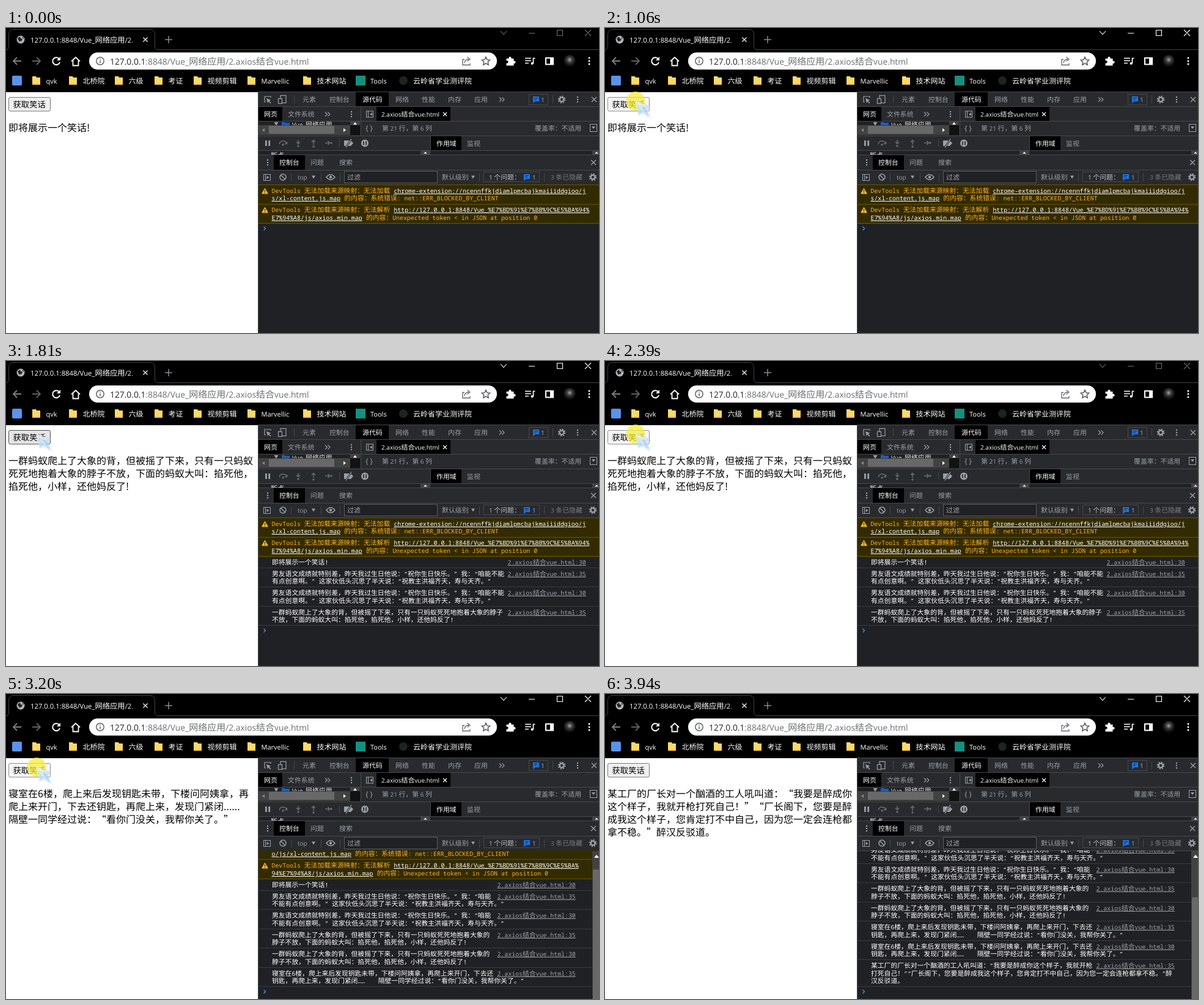
Animation of 970 by 499 pixels, one loop 4.35 s. Source, as an HTML page:

```html
<!DOCTYPE html>
<html lang="zh-CN">
<head>
<meta charset="utf-8">
<title>axios + vue</title>
<style>
html, body { margin: 0; width: 100%; height: 100%; overflow: hidden; background: #000; }
svg { display: block; text-spacing-trim: space-all; }
text { white-space: pre; text-rendering: geometricPrecision; font-family: "Noto Sans CJK SC", sans-serif; }
.ui { font-family: "Open Sans", "Noto Sans CJK SC", sans-serif; }
.mono { font-family: "Noto Sans Mono", monospace; }
.strong, #rows { font-weight: 500; }
.u { text-decoration: underline; text-decoration-skip-ink: none; }
</style>
</head>
<body>
<svg id="stage" width="970" height="499" viewBox="0 0 970 499" xmlns="http://www.w3.org/2000/svg"></svg>
<script>
const LOOP = 4350;
const CJK = /[\u3000-\u9fff\uff00-\uffef]+|[^\u3000-\u9fff\uff00-\uffef]+/g;
const isCjk = c => /[\u3000-\u9fff\uff00-\uffef]/.test(c);
const GREY = '#9aa0a6', LIGHT = '#e8eaed', ORANGE = '#ffb02a', BAR = '#292a2d', LINE = '#46484c';

// drawing helpers
const esc = s => s.replace(/&/g, '&amp;').replace(/</g, '&lt;');
const rect = (x, y, w, h, fill, more = '') => `<rect x="${x}" y="${y}" width="${w}" height="${h}" fill="${fill}" ${more}/>`;
const circ = (x, y, r, fill, more = '') => `<circle cx="${x}" cy="${y}" r="${r}" fill="${fill}" ${more}/>`;
const line = (d, color, w = 1, more = '') => `<path d="${d}" fill="none" stroke="${color}" stroke-width="${w}" ${more}/>`;
const shape = (d, fill, more = '') => `<path d="${d}" fill="${fill}" ${more}/>`;
const runs = (s, size, cls) => s.match(CJK).map(p => isCjk(p[0])
  ? `<tspan>${p}</tspan>`
  : `<tspan class="${cls}" font-size="${(size * .9167).toFixed(2)}">${esc(p)}</tspan>`).join('');
const text = (x, y, s, size, fill, cls = 'ui', more = '') =>
  `<text x="${x}" y="${y}" font-size="${size}" fill="${fill}" ${more}>${runs(s, size, cls)}</text>`;
const label = (x, y, s, fill = GREY) => text(x, y, s, 10.9, fill);
const strong = (x, y, s, size, fill = '#fff') => text(x, y, s, size, fill, 'ui', 'class="strong"');
const mono = (x, y, s, fill, more) => text(x, y, s, 10.8, fill, 'mono', more);
const cross = (x, y, r, color, w = 1.4) => line(`M${x - r} ${y - r}l${2 * r} ${2 * r}m0 ${-2 * r}l${-2 * r} ${2 * r}`, color, w);
const dots = (x, y, color, gap = 4, r = 1.2) => [-1, 0, 1].map(i => circ(x, y + i * gap, r, color)).join('');
const gear = (x, y) => circ(x, y, 3.4, 'none', `stroke="${GREY}" stroke-width="2.4"`) +
  circ(x, y, 5.3, 'none', `stroke="${GREY}" stroke-width="2" stroke-dasharray="2.08"`);
const bubble = (x, y) => shape(`M${x - 5} ${y - 5}h10v8h-6l-4 3z`, '#1a73e8') + line(`M${x - 3} ${y - 2.5}h6m-6 2.5h4`, BAR);
const sep = (x, y, h = 13) => line(`M${x} ${y}v${h}`, LINE);
const tri = (x, y, w, h, color) => shape(`M${x - w} ${y - h}h${2 * w}l${-w} ${2 * h}z`, color);
const more = (x, y) => line(`M${x} ${y - 3.5}l3.5 3.5-3.5 3.5m4.500-7l3.500 3.500-3.500 3.500`, GREY, 1.1);

function browser() {
  const folder = x => shape(`M${x} 79h6l1 2h6v12h-13z`, '#fbd968') + shape(`M${x} 91h13v2h-13z`, '#eebd45');
  const marks = [[43, 'qvk'], [103, '北桥院'], [178, '六级'], [243, '考证'], [307, '视频剪辑'], [395, 'Marvellic'], [486, '技术网站']];
  return rect(0, 0, 970, 105, '#000') +
    line('M0 35.5Q4.5 35.5 4.5 30V11Q4.5 2.5 12 2.5H236Q243.5 2.5 243.5 11V30Q243.5 35.5 249 35.5H970', '#404245') +
    circ(24, 19, 6.5, '#b4b7ba') + shape('M19 17l4-3 1 3 3 1-2 4-2-1-1 2zM26 14l3 2-1 2z', '#222') +
    strong(40, 24, '127.0.0.1:8848/Vue_网络应用/2.', 12.3) + rect(202, 8, 18, 24, 'url(#fade)') +
    cross(228, 19, 3.6, '#e8eaed') + line('M260 19h12m-6-6v12', '#888b8e', 1.5) +
    line('M25 54H12m6-6l-6 6 6 6', '#7d8084', 1.8) + line('M43 54h13m-6-6l6 6-6 6', '#5d6064', 1.8) +
    line('M87 50.5A6 6 0 1 0 88 56', '#fff', 2) + shape('M89 47v6h-6z', '#fff') +
    line('M107 54.5l7-6.5 7 6.5M109.5 53v8.5h9V53', '#fff', 1.8) +
    rect(136, 40, 667, 28, '#fff', 'rx="14"') +
    circ(154, 54, 6.2, 'none', 'stroke="#5f6368" stroke-width="1.5"') + line('M154 53v4.5m0-7.5v1.6', '#5f6368', 1.5) +
    `<text x="170" y="59.5" font-size="15"><tspan class="ui" font-size="13.8" fill="#202124">127.0.0.1</tspan><tspan fill="#6a6e73">${runs(':8848/Vue_网络应用/2.axios结合vue.html', 15.05, 'ui')}</tspan></text>` +
    line('M750 51.5h-3v9h12v-3M750 57q1-6 7-6m-2.5-3.5l4.5 3.5-4.5 3.5', '#5f6368', 1.3) +
    line('M785 47.5l2 4.4 4.7.5-3.5 3.2 1 4.7-4.2-2.4-4.2 2.4 1-4.7-3.5-3.2 4.7-.5z', '#4b4f53', 1.4) +
    shape('M818.5 50h4a2.2 2.2 0 1 1 4 0h4v4a2.2 2.2 0 1 1 0 4v3.5h-12v-4a2.2 2.2 0 1 0 0-4z', '#fff') +
    line('M849 49.5h10m-10 4h10m-10 4h6M862.5 58V49.5h3', '#fff', 1.7) + circ(860.7, 58, 2.1, '#fff') +
    rect(883, 49, 12, 10.5, 'none', 'stroke="#fff" stroke-width="2"') + rect(890, 49, 5, 10, '#fff') +
    circ(922, 54, 10, 'url(#photo)') + dots(954, 54, '#fff', 5, 1.5) +
    rect(10, 78, 16, 16, '#5a93ea', 'rx="2"') +
    marks.map(([x, s]) => folder(x) + strong(x + 22.5, 91, s, 12)).join('') +
    rect(572, 78, 16, 16, '#15907f') + strong(596, 91, 'Tools', 12) +
    circ(650, 86, 7, '#1c2422') + strong(666, 91, '云岭省学业测评院', 12);
}

function devtools() {
  const tab = (x, y, w, h) => rect(x, y, w, h, '#000');
  const hr = y => line(`M413 ${y}H970`, LINE);
  const tabs = [[485, '元素'], [529, '控制台'], [637, '网络'], [680, '性能'], [723, '内存'], [766, '应用']];
  return rect(412, 104, 558, 395, '#202124') + rect(413, 105, 557, 152, BAR) + line('M412.5 104V499M412 104.5H970', LINE) +
    // main tabs
    line('M425 121h-2v-9h10v2', GREY, 1.2) + shape('M426 115l7.5 3-3 1 3 3.5-1.2 1-3-3.3-1.3 2.8z', GREY) +
    rect(449, 110.5, 9, 12, 'none', `stroke="${GREY}" stroke-width="1.2"`) + rect(445.5, 115.5, 6, 8, BAR, `stroke="${GREY}" stroke-width="1.2"`) +
    sep(471.5, 110) + tabs.map(([x, s]) => label(x, 121, s)).join('') +
    tab(572, 105, 54, 23) + label(583, 121, '源代码', '#fff') + more(807, 117) +
    rect(855.5, 108.5, 31, 17, 'none', `stroke="${LINE}"`) + bubble(867, 117) + label(875, 121, '1', '#8ab4f8') +
    sep(894.5, 110) + gear(909, 117) + dots(935, 117, GREY) + cross(962, 117, 4, GREY) + hr(128.5) +
    // navigator and editor
    tab(413, 129, 39, 23) + label(422, 145, '网页', '#fff') + label(461, 145, '文件系统') + more(522, 141) + dots(565, 141, GREY) +
    line('M580.5 129v47', LINE) + rect(589.5, 136, 11, 10, 'none', `stroke="${GREY}"`) + line('M592.5 136v10', GREY) + shape('M599 138.5v5l-4-2.5z', GREY) +
    tab(606, 129, 121, 23) + label(614, 145, '2.axios结合vue.html', '#fff') + cross(718, 141, 3, '#fff', 1.2) + hr(152.5) +
    rect(413, 153, 167, 23, '#202124') +
    `<g clip-path="url(#tree)">${tri(442, 157, 3.5, 3, GREY)}${shape('M451 154h5l1 1h7v9h-13z', '#1a5fc0')}${label(468, 162, 'Vue_网络应用', LIGHT)}</g>` +
    rect(563, 153, 16, 6, '#424242') + rect(563, 159, 16, 16, '#121212') + tri(571, 156, 3, -2, '#fff') +
    rect(413, 159, 150, 16, '#424242') + rect(430, 160, 107, 13, '#686868') + shape('M423 164v6l-4-3z', '#8a8a8a') + shape('M552 164v6l4-3z', '#fff') +
    strong(588, 168, '{ }', 13, GREY) + label(615, 168, '第 21 行，第 6 列') + label(865, 168, '覆盖率：不适用') +
    rect(955.5, 157.5, 11, 12, 'none', `stroke="${GREY}"`) + tri(961, 163, 3, 2, GREY) + hr(176.5) +
    // debugger
    rect(424, 184, 2.8, 9, GREY) + rect(429.3, 184, 2.8, 9, GREY) +
    line('M447 190q1-5 6-5t6 4m.5-3v3.5h-4', '#696c70', 1.5) + circ(453, 191, 1.7, '#696c70') +
    line('M478 183v6m-3-2.5l3 3 3-3', '#696c70', 1.5) + circ(478, 193, 1.7, '#696c70') +
    line('M503 191v-7m-3 2.5l3-3 3 3', '#696c70', 1.5) + circ(503, 194, 1.7, '#696c70') +
    line('M522 188h7m-2.5-3l3 3-3 3', '#696c70', 1.5) + circ(532, 188, 1.7, '#696c70') +
    sep(545.5, 182) + shape('M553 184h11l4 4.5-4 4.5h-11z', GREY) + line('M556 195.5l9-14', BAR, 3) + line('M556 195.5l9-14', GREY, 1.3) +
    circ(587, 188.5, 6, GREY) + line('M585 185.5v6m4-6v6', BAR, 1.7) +
    line('M694.5 177v30', LINE) + tab(695, 177, 50, 23) + label(704, 193, '作用域', '#fff') + label(754, 193, '监视') + hr(200.5) +
    rect(413, 201, 557, 6, '#202124') + `<g clip-path="url(#pane)">${label(428, 212, '▸断点', LIGHT)}</g>` +
    rect(678, 201, 16, 6, '#424242') + tri(686, 204, 2.8, -1.5, '#fff') + rect(959, 201, 11, 6, '#424242') + tri(966, 204, 2.8, -1.5, '#fff') + hr(207.5) +
    // console drawer
    dots(428, 220, GREY) + tab(438, 208, 51, 24) + label(447, 224, '控制台', '#fff') + label(498, 224, '问题') + label(545, 224, '搜索') + cross(961, 220, 4, GREY) + hr(232.5) +
    rect(421.5, 239.5, 11, 10, 'none', `stroke="${GREY}"`) + line('M424.5 239.5v10', GREY) + shape('M426.5 242v5l4-2.5z', GREY) +
    circ(453, 244, 5, 'none', `stroke="${GREY}" stroke-width="1.5"`) + line('M449.5 240.5l7 7', GREY, 1.5) +
    sep(466.5, 238) + label(477, 248, 'top') + tri(503, 244, 3, 2.5, GREY) + sep(515.5, 238) +
    line('M524 244q7-8.5 14 0q-7 8.5-14 0z', GREY, 1.5) + circ(531, 244, 2.2, GREY) + sep(546.5, 238) +
    rect(553.5, 234.5, 152, 19, '#202124', 'stroke="#5a5d61"') + label(558, 248, '过滤', '#a5a8ac') +
    label(713, 248, '默认级别') + tri(764, 244, 3, 2.5, GREY) + sep(774.5, 238) +
    rect(781.5, 235.5, 91, 16, 'none', `stroke="${LINE}"`) + label(790, 248, '1 个问题：', '#bdc1c6') + bubble(852, 244) + label(861, 248, '1', '#8ab4f8') +
    sep(880.5, 238) + label(891, 248, '3 条已隐藏', '#777b80') + gear(960, 244) + hr(256.5);
}

// "|" marks the line breaks of the page paragraph
const msgs = [
  '即将展示一个笑话!',
  '男友语文成绩就特别差，昨天我过生日他说：“祝你生日|快乐。” 我：“咱能不能有点创意啊。” 这家伙低头沉|思了半天说：“祝教主洪福齐天，寿与天齐。”',
  '一群蚂蚁爬上了大象的背，但被摇了下来，只有一只蚂蚁|死死地抱着大象的脖子不放，下面的蚂蚁大叫：掐死他，|掐死他，小样，还他妈反了!',
  '寝室在6楼，爬上来后发现钥匙未带，下楼问阿姨拿，再|爬上来开门，下去还钥匙，再爬上来，发现门紧闭......|隔壁一同学经过说：“看你门没关，我帮你关了。”',
  '某工厂的厂长对一个酗酒的工人吼叫道：“我要是醉成你|这个样子，我就开枪打死自己！”“厂长阁下，您要是醉|成我这个样子，您肯定打不中自己，因为您一定会连枪都|拿不稳。”醉汉反驳道。'
];
const warns = [
  ['加载', 'chrome-extension://ncennffkjdiamlpmcbajkmaiiiddgioo/js/xl-content.js.map', '系统错误: net::ERR_BLOCKED_BY_CLIENT', 53, 50],
  ['解析', 'http://127.0.0.1:8848/Vue_%E7%BD%91%E7%BB%9C%E5%BA%94%E7%94%A8/js/axios.min.map', 'Unexpected token < in JSON at position 0', 54, 51]
];
const CONSOLE_TOP = 257, ROW = 12.6, PAD = 6.3, LAST = 479.3;

function wrap(s, first, rest) {
  const out = [''];
  let x = 435;
  for (const c of s) {
    const w = isCjk(c) ? 10.8 : 5.94;
    if (x + w > (out.length > 1 ? rest : first)) { out.push(''); x = 435; }
    out[out.length - 1] += c;
    x += w;
  }
  return out;
}

function consoleRows(count) {
  const narrow = count > 5, right = narrow ? 932 : 949, linkX = right - 128.5;
  const logs = Array.from({ length: count }, (_, i) => ({
    lines: wrap(msgs[Math.ceil(i / 2)].replace('......|', '……　　').replace(/\|/g, ''), linkX - 3, right),
    no: i % 2 ? 35 : 30
  }));
  const height = 63 + logs.reduce((h, r) => h + r.lines.length * ROW + PAD, 0);
  const scroll = Math.max(0, CONSOLE_TOP + height - LAST);
  let y = CONSOLE_TOP - scroll, out = '';
  // text and borders sit on whole pixels
  const base = i => Math.round(y + 12.8 + i * ROW);
  const border = (at, color) => rect(413, Math.round(at) - 1, 557, 1, color);
  for (const [verb, url, why, wide, slim] of warns) {
    const cut = narrow ? slim : wide, m = base(0) - 3;
    out += rect(413, Math.round(y), 557, 32, '#332b00') + border(y, '#665500') + border(y + 31.5, '#665500') +
      shape(`M423.5 ${m - 4.5}l4.8 8.500h-9.6z`, '#f9b82b', 'stroke="#f9b82b" stroke-linejoin="round"') + line(`M423.5 ${m - 2}v3m0 1v1.3`, '#332b00', 1.3) +
      mono(434.5, base(0), `DevTools 无法加载来源映射：无法${verb} `, ORANGE) +
      mono(634.4, base(0), url.slice(0, cut), '#fff', 'class="u"') +
      mono(434.5, base(1), url.slice(cut), '#fff', 'class="u"') +
      mono(434.5 + (url.length - cut + 1) * 5.94, base(1), '的内容：' + why, ORANGE);
    y += 31.5;
  }
  for (const { lines, no } of logs) {
    lines.forEach((s, i) => out += mono(435, base(i), s, '#fff'));
    out += mono(linkX, base(0), `2.axios结合vue.html:${no}`, GREY, 'class="u"');
    y += lines.length * ROW + PAD;
    out += border(y, '#3a3b3e');
  }
  out += line(`M421.5 ${Math.round(y) + 5}l3 3-3 3`, '#3b8fd8', 1.5);
  if (narrow) {
    const top = 277 + scroll * .6;
    out += rect(959, 257, 11, 242, '#424242') + tri(966, 265.5, 4, -2.5, '#fff') + rect(960, top, 10, 499 - top, '#686868');
  }
  return out;
}

// time, log rows, mouse button down
const steps = [
  [0, 0, 0], [1060, 0, 1], [1130, 1, 0], [1200, 2, 0],
  [1660, 2, 1], [1730, 3, 0], [1810, 4, 0],
  [2390, 4, 1], [2480, 5, 0], [2610, 6, 0],
  [3200, 6, 1], [3280, 7, 0], [3340, 8, 0]
];
// time, cursor tip (null: hidden)
const moves = [
  [0, null], [70, [125, 197]], [270, [121, 192]], [340, [108, 178]], [400, [89, 157]],
  [460, [69, 137]], [520, [55, 124]], [590, [50, 119]],
  [3670, [82, 137]], [3740, [205, 205]], [3800, [430, 326]], [3870, [711, 467]], [3940, null]
];
const at = (table, t) => table.findLast(s => t >= s[0]);
const titleLit = t => (t >= 70 && t < 270) || (t >= 1060 && t < 2390) || t >= 3200;

const stage = document.getElementById('stage');
stage.innerHTML = `<defs>
  <linearGradient id="fade"><stop stop-color="#000" stop-opacity="0"/><stop offset=".9" stop-color="#000"/></linearGradient>
  <radialGradient id="photo" cx=".5" cy=".4"><stop stop-color="#a3a3a3"/><stop offset=".45" stop-color="#3c3c3c"/><stop offset="1" stop-color="#0a0a0a"/></radialGradient>
  <linearGradient id="ice" x2="1" y2="1"><stop stop-color="#eef7fd"/><stop offset=".45" stop-color="#b4d8f2"/><stop offset="1" stop-color="#dcefff" stop-opacity=".5"/></linearGradient>
  <filter id="soft"><feGaussianBlur stdDeviation=".9"/></filter>
  <clipPath id="tree"><rect x="413" y="153" width="150" height="6"/></clipPath>
  <clipPath id="pane"><rect x="413" y="201" width="265" height="6"/></clipPath>
  <clipPath id="log"><rect x="413" y="256" width="557" height="243"/></clipPath>
  </defs>` + browser() + rect(0, 105, 412, 394, '#fff') + devtools() +
  `<g id="title" fill="none" stroke-width="1.1"><path d="M809 5l5 5.5 5-5.5M855 8.5h10M901.5 3.5h9v9h-9zM947 3l10 10m0-10l-10 10"/></g>
  <g id="page"></g><g id="rows" clip-path="url(#log)"></g>
  <circle id="click" cx="50" cy="119.5" r="15.5" fill="#f4ec3c" opacity=".75"/>
  <g id="cursor" filter="url(#soft)">${shape('M0 0L23 9L18 14L28 32L11 20L5 24z', 'url(#ice)', 'opacity=".88"')}${line('M5 4l12 6M7 9l7 9', '#fff', 2, 'opacity=".7"')}${line('M12 12l5 6 4 7', '#6aaee6', 1.5, 'opacity=".55"')}</g>`;
const $ = id => document.getElementById(id);

const skins = { idle: ['#efefef', '#767676'], hover: ['#e5e5e5', '#4f4f4f'], down: ['#f5f5f5', '#8d8d8d'] };
function page(joke, skin) {
  const [bg, edge] = skins[skin];
  return rect(4.5, 113.5, 68, 22.5, bg, `stroke="${edge}" rx="2.5"`) +
    `<text x="11.5" y="130" font-size="13.33">获取笑话</text>` +
    msgs[joke].split('|').map((s, i) => `<text x="4" y="${169 + i * 21}" font-size="16">${s}</text>`).join('');
}

const cache = {};
function put(id, key, make) {
  if (cache[id] === key) return;
  cache[id] = key;
  $(id).innerHTML = make();
}

function draw(now) {
  const t = now % LOOP;
  const [, count, down] = at(steps, t), tip = at(moves, t)[1];
  const joke = Math.floor(count / 2);
  const skin = down ? 'down' : t >= 520 && t < 3670 ? 'hover' : 'idle';
  put('page', joke + skin, () => page(joke, skin));
  put('rows', count, () => consoleRows(count));
  $('title').setAttribute('stroke', titleLit(t) ? '#fff' : '#6c6c6c');
  $('click').style.display = down ? '' : 'none';
  $('cursor').style.display = tip ? '' : 'none';
  if (tip) $('cursor').setAttribute('transform', `translate(${tip})`);
}

const start = performance.now();
function tick() {
  draw(performance.now() - start);
  requestAnimationFrame(tick);
}
tick();
</script>
</body>
</html>
```
